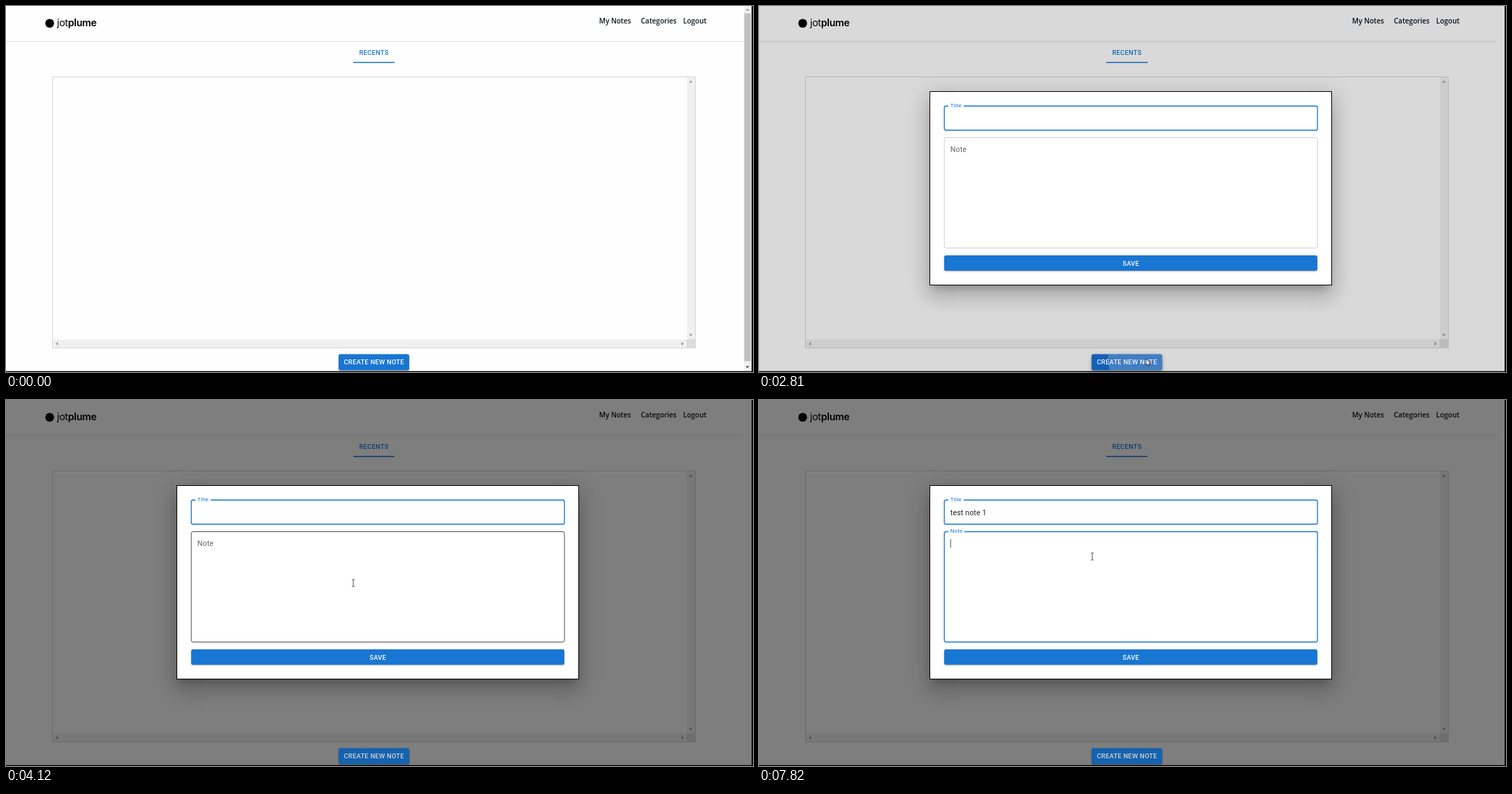
Recreate the animation shown at these times as an HTML page. Size 1069 by 524 pixels, loop 8 s.

```html
<!DOCTYPE html>
<html lang="en">
<head>
<meta charset="utf-8">
<title>Notes</title>
<style>
html, body { margin: 0; width: 100%; height: 100%; overflow: hidden; background: #fefefe; }
svg, div { position: absolute; left: 0; top: 0; }
svg { width: 1069px; height: 524px; }
text { font-family: Roboto, sans-serif; font-size: 10.7px; letter-spacing: .1px; }
.caps { font-size: 9.35px; font-weight: 500; letter-spacing: .267px; text-anchor: middle; }
.nav { font: 600 10px "Open Sans", sans-serif; letter-spacing: 0; fill: #0b1520; }
.brand { font: 400 14.2px Inter, sans-serif; letter-spacing: -.3px; }
.brand tspan { font-weight: 600; }
.field { fill: none; }
#shade { width: 1067px; height: 523px; background: #000; }
#modal { left: 244px; top: 122px; width: 574.4px; height: 276.4px; border: 1.3px solid #000; background: #fff;
  box-shadow: 0 7.3px 10px -4.7px #0003, 0 16px 25px 2px #00000024, 0 6px 31px 5.3px #0000001f; }
</style>
</head>
<body>
<svg>
  <circle cx="62.5" cy="24.7" r="6.3"/>
  <text class="brand" x="73" y="28.6">jot<tspan>plume</tspan></text>
  <text class="nav" x="848.7" y="24.6">My Notes</text>
  <text class="nav" x="908.5" y="24.6">Categories</text>
  <text class="nav" x="969" y="25">Logout</text>
  <path d="M0 50.8H1055" stroke="#dcdcdc"/>
  <text class="caps" x="526.5" y="69.6" fill="#1976d2">RECENTS</text>
  <path d="M497 80.7h59" stroke="#1976d2" stroke-width="1.4"/>
  <rect x="66.5" y="101.5" width="920" height="388" fill="none" stroke="#d6d6d6"/>
  <path d="M974.5 102h11.5v375h-11.5zM67 477.5h907v11.5H67z" fill="#f0f0f0"/>
  <path d="M974 477h12v12h-12z" fill="#dcdcdc"/>
  <path d="M977.3 109.5h5.4l-2.7-3zM977.3 469.7h5.4l-2.7 3zM74.3 480.8v5.4l-3-2.7zM966.8 480.8v5.4l3-2.7z" fill="#9a9a9a"/>
  <g id="bar">
    <path d="M1056 0h11v523h-11z" fill="#f1f1f1"/>
    <path d="M1056.5 10.5h9.5v498h-9.5z" fill="#c1c1c1"/>
    <path d="M1058.3 6.5h5.4l-2.7-3z" fill="#9a9a9a"/>
    <path d="M1058.3 515.5h5.4l-2.7 3z" fill="#505050"/>
  </g>
</svg>
<div id="shade"></div>
<div id="modal"></div>
<svg>
  <clipPath id="clip"><rect x="476" y="498.5" width="101" height="23" rx="2.7"/></clipPath>
  <g id="create">
    <rect id="face" x="476" y="498.5" width="101" height="23" rx="2.7"/>
    <circle id="ripple" cx="554" cy="505" fill="#fff" clip-path="url(#clip)"/>
    <text class="caps" x="526.6" y="513" fill="#fff">CREATE NEW NOTE</text>
  </g>
  <g id="form">
    <rect class="field" x="265.2" y="143.2" width="534" height="34.6" rx="2.4" stroke="#1976d2" stroke-width="1.35"/>
    <path d="M271 143.2h22" stroke="#fff" stroke-width="3"/>
    <text x="273.8" y="145.2" fill="#1976d2" style="font-size:8px">Title</text>
    <text id="typed" x="273.8" y="164.6" fill="#212121"></text>
    <rect id="note" class="field" x="265.2" y="188.5" width="534" height="158" rx="2.4"/>
    <path id="notch" d="M271 188.5h23" stroke="#fff" stroke-width="3"/>
    <text id="label">Note</text>
    <rect x="265" y="357" width="534" height="22" rx="2.7" fill="#1976d2" style="filter:drop-shadow(0 1.3px 1.3px #0005)"/>
    <text class="caps" x="532.2" y="371.7" fill="#fff">SAVE</text>
    <path id="caret" stroke="#222" stroke-width=".8"/>
  </g>
  <path d="M1067 0h2v524h-2zM0 522.8h1069v1.2H0z"/>
  <path id="arrow" d="M0 0v9.6l2.2-2 1.5 3.4 1.5-.7-1.5-3.2h3z" fill="#fff" stroke="#000" stroke-width=".7"/>
  <path id="beam" d="M-2-5h1.3l.7.6.7-.6H2M0-4.4V4.4M-2 5h1.3l.7-.6.7.6H2" fill="none" stroke="#222" stroke-width=".8"/>
</svg>
<script>
const LOOP = 8000, BLUE = "#1976d2";
const el = Object.fromEntries([...document.querySelectorAll("[id]")].map(e => [e.id, e]));
const show = (e, on) => e.style.display = on ? "" : "none";
const mix = (a, b, k) => a + (b - a) * k;
const ramp = (t, start, length) => Math.min(1, Math.max(0, (t - start) / length));

// cubic-bezier(.4, 0, .2, 1)
function ease(x) {
  let lo = 0, hi = 1, s = .5;
  for (let i = 0; i < 24; i++) {
    s = (lo + hi) / 2;
    const bx = 1.2 * (1 - s) ** 2 * s + .6 * (1 - s) * s * s + s ** 3;
    if (bx < x) lo = s; else hi = s;
  }
  return s * s * (3 - 2 * s);
}

// Pointer strokes: start, end, then the points of a quadratic curve; each rests until "until".
const strokes = [
  { from: 400, to: 940, until: 940, p: [[743, 512], [668, 370], [600, 523]] },
  { from: 1200, to: 1940, until: 2880, p: [[580, 191], [512, 350], [554, 505]] },
  { from: 2880, to: 3330, until: 4120, p: [[554, 505], [545, 400], [497, 262]] },
  { from: 4120, to: 4530, until: 7290, p: [[497, 262], [470, 200], [444, 159]] },
  { from: 7290, to: 7480, until: LOOP, p: [[444, 159], [455, 195], [477, 224]] }
];
function pointer(t) {
  const s = strokes.find(s => t >= s.from && t < s.until);
  if (!s) return null;
  const k = ease(ramp(t, s.from, s.to - s.from)), [a, b, c] = s.p;
  return [0, 1].map(i => mix(mix(a[i], b[i], k), mix(b[i], c[i], k), k));
}

const title = "test note 1";
const keys = [5270, 5360, 5450, 5540, 5800, 6000, 6210, 6310, 6410, 6510, 6610];

function draw(t) {
  const open = t >= 2810;
  const dim = open ? ease(ramp(t, 2750, 225)) : 0;
  show(el.bar, !open);
  show(el.modal, open);
  show(el.form, open);
  el.shade.style.opacity = dim / 2;

  const hover = ease(ramp(t, 1960, 250)) - ease(ramp(t, 2900, 250));
  el.face.setAttribute("fill", `rgb(${mix(25, 21, hover)},${mix(118, 101, hover)},${mix(210, 192, hover)})`);
  el.face.style.filter = `drop-shadow(0 ${mix(1, 2, hover)}px ${mix(1.3, 2.4, hover)}px #0006)`;
  el.create.style.filter = `brightness(${1 - .17 * dim})`;
  el.ripple.setAttribute("r", 80 * ease(ramp(t, 2570, 550)));
  el.ripple.setAttribute("opacity", .2 * (1 - ease(ramp(t, 2960, 370))));

  const at = pointer(t);
  const inside = (top, bottom) => at && at[0] > 265 && at[0] < 799 && at[1] > top && at[1] < bottom;
  const overNote = inside(188, 347), text = open && (overNote || inside(143, 178));
  show(el.arrow, at && !text);
  show(el.beam, at && text);
  if (at) (text ? el.beam : el.arrow).setAttribute("transform", `translate(${at})`);

  const focus = t >= 7620, lift = focus ? ease(ramp(t, 7580, 200)) : 0;
  el.note.setAttribute("stroke", focus ? BLUE : overNote ? "#212121" : "#c4c4c4");
  el.note.setAttribute("stroke-width", focus ? 1.35 : .8);
  show(el.notch, focus);
  el.label.setAttribute("transform", `translate(273.8 ${mix(208.6, 190.2, lift)}) scale(${mix(1, .75, lift)})`);
  el.label.setAttribute("fill", focus ? BLUE : "#666");

  const count = keys.filter(k => k <= t).length;
  el.typed.textContent = title.slice(0, count);
  const end = [..."x".repeat(count)].length ? caretX(count) : 274.2;
  el.caret.setAttribute("d", focus ? "M274.2 199v12.5" : `M${end} 154.3v12.5`);
  show(el.caret, focus || (t >= 4430 && t < 4930) || (t >= keys[0] && t < 7140));
}

const ruler = document.createElement("canvas").getContext("2d");
function caretX(count) {
  ruler.font = "10.7px Roboto, sans-serif";
  return 274.2 + ruler.measureText(title.slice(0, count)).width + .1 * count;
}

function tick(now) {
  draw(now % LOOP);
  requestAnimationFrame(tick);
}
draw(0);
requestAnimationFrame(tick);
</script>
</body>
</html>
```
